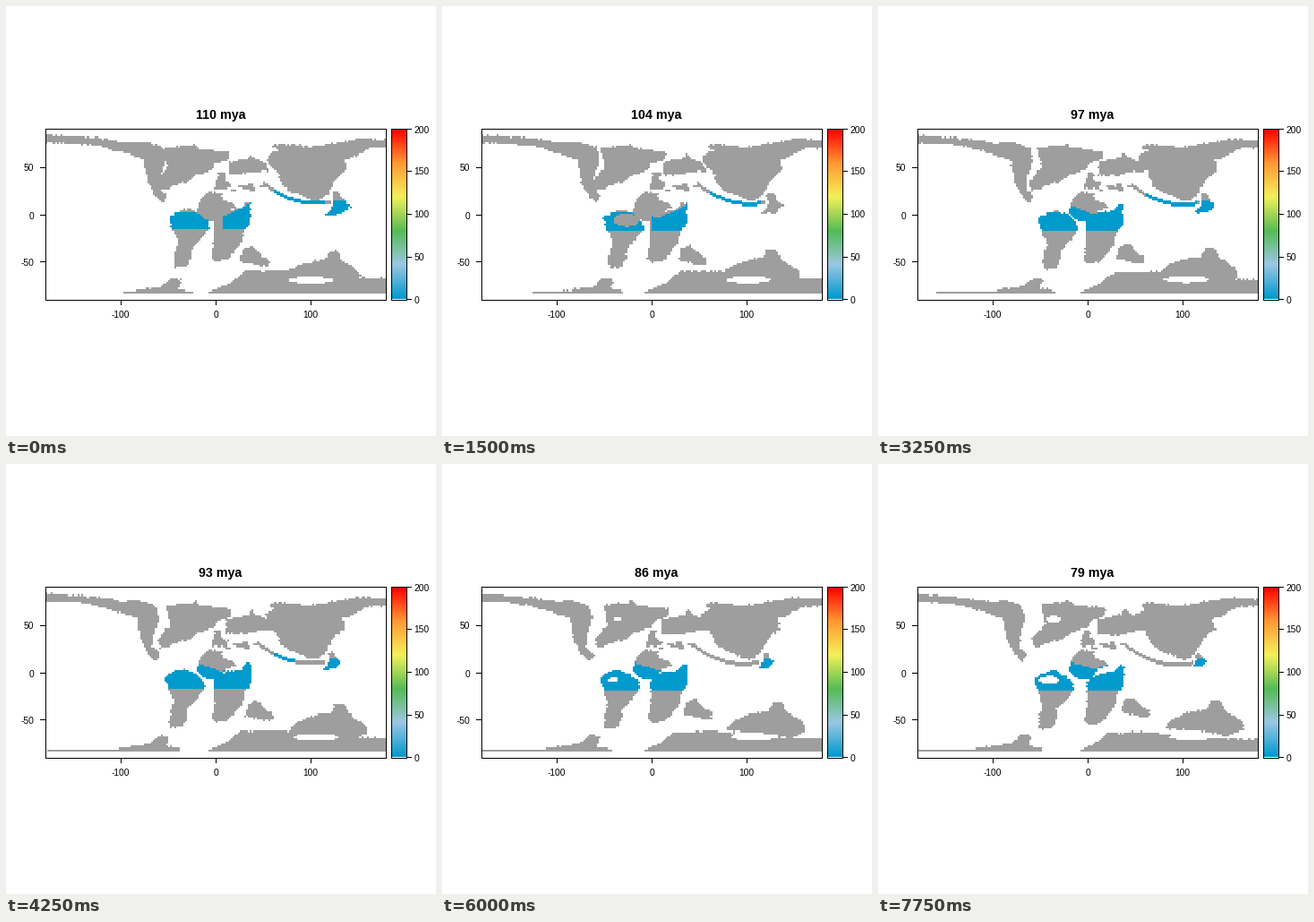
A matplotlib script for the animation above (8 s loop, 480 by 480 pixels).

```python
import matplotlib.pyplot as plt
import numpy as np
from matplotlib.animation import FuncAnimation
from matplotlib.colors import LinearSegmentedColormap, ListedColormap
from matplotlib.patches import Rectangle
from matplotlib.path import Path

SIZE, DPI = 480, 72
FIRST_AGE, MID_AGE, STEPS = 110, 95, 32
LEFT, RIGHT, TOP, BOTTOM = 44, 424, 137, 327
COLS, ROWS = 180, 90
LAST_ROW = 87  # no land this close to the south pole

# Cell centres in stage pixels, shaken a little for rough coasts
rng = np.random.default_rng(4)
X, Y = np.meshgrid(LEFT + (np.arange(COLS) + 0.5) * (RIGHT - LEFT) / COLS,
                   TOP + (np.arange(ROWS) + 0.5) * (BOTTOM - TOP) / ROWS)
cells = np.stack([X, Y], -1).reshape(-1, 2)
shaken = cells + rng.normal(0, 0.5, cells.shape)


class Plate:
    """Coast at MID_AGE; drifts and grows evenly with time."""

    def __init__(self, drift, grow, *coast):
        self.coast = np.array(coast, float)
        self.drift = np.array(drift)
        self.grow = grow

    def mask(self, t):
        mid = self.coast.mean(0)
        coast = mid + (self.coast - mid) * (1 + self.grow * t) + self.drift * t
        return Path(coast).contains_points(shaken).reshape(ROWS, COLS)


plates = {
    "west america": Plate(
        (-7, 0.5), 0, (30, 144), (72, 146), (108, 149), (132, 153), (150, 152),
        (168, 158), (172, 172), (166, 190), (165, 204), (174, 213), (168, 220),
        (160, 212), (152, 198), (147, 172), (126, 165), (98, 157), (72, 154),
        (30, 153)),
    "east america": Plate(
        (3, -1), 0, (178, 158), (212, 154), (216, 158), (252, 162), (250, 170),
        (236, 175), (232, 183), (214, 188), (204, 196), (184, 203), (172, 206),
        (168, 196), (184, 180), (182, 172)),
    "asia": Plate(
        (-2, 0.5), 0, (290, 167), (302, 162), (295, 157), (304, 154), (340, 158),
        (372, 152), (395, 148), (430, 150), (430, 158), (404, 159), (390, 167),
        (376, 172), (378, 184), (366, 194), (356, 212), (344, 219), (318, 208),
        (306, 200), (301, 186), (292, 178)),
    "baltic": Plate(
        (2, 0), 0.15, (246, 174), (270, 169), (275, 164), (280, 169), (294, 174),
        (299, 186), (286, 185), (266, 189), (246, 189)),
    "europe": Plate(
        (-4, 0), 0, (234, 186), (242, 186), (240, 194), (248, 198), (246, 203),
        (229, 204)),
    "north africa": Plate(
        (0, 0), 0, (212, 228), (218, 216), (226, 208), (240, 208), (244, 217),
        (258, 224), (244, 230), (240, 240), (226, 240), (214, 234)),
    "south africa": Plate(
        (1, 3), 0, (232, 240), (246, 231), (262, 229), (268, 222), (274, 222),
        (274, 244), (266, 254), (264, 266), (256, 277), (248, 285), (236, 288),
        (229, 283), (233, 264), (232, 250)),
    "south america": Plate(
        (-4, 2), 0, (178, 238), (188, 231), (200, 228), (212, 234), (222, 242),
        (223, 250), (214, 262), (204, 272), (203, 283), (198, 293), (184, 294),
        (184, 280), (188, 266), (182, 250)),
    "india": Plate(
        (5, -4), 0, (266, 281), (270, 268), (280, 264), (290, 275), (298, 279),
        (298, 287), (286, 286)),
    "australia": Plate(
        (6, -5), 0, (314, 300), (322, 290), (340, 282), (362, 278), (366, 269),
        (377, 269), (381, 279), (400, 292), (403, 302), (385, 308), (350, 303)),
    "antarctica": Plate(
        (-5, 2), 0, (216, 324), (246, 311), (262, 298), (312, 297), (345, 302),
        (400, 305), (435, 305), (435, 324)),
    "peninsula": Plate(
        (-13, -1), 0, (104, 323), (130, 317), (160, 313), (174, 302), (184, 305),
        (180, 315), (196, 318), (196, 323)),
    "east isle": Plate(
        (-6, -1), -0.3, (360, 210), (366, 209), (370, 217), (376, 222),
        (368, 229), (354, 230), (361, 221)),
}
islets = rng.uniform((246, 199), (282, 206), (7, 2))


def near(x, y, rx, ry):
    """Elliptic spot."""
    return ((X - x) / max(rx, 0.01)) ** 2 + ((Y - y) / max(ry, 0.01)) ** 2 < 1


def grid_at(age):
    """0 sea, 1 land, 2 warm land."""
    t = (MID_AGE - age) / 16
    s = (FIRST_AGE - age) / (STEPS - 1)
    late = max(t, 0)
    cool = np.exp(-((age - 101.5) / 3) ** 4)
    part = {name: plate.mask(t) for name, plate in plates.items()}

    # Island arc south of Asia, polar strip and loose islets
    bend = X + 6 * t - 340
    arc = (np.abs(Y - 222 - 2 * t + 22 * (bend / 58) ** 2) < 2.1) & (np.abs(bend + 20) < 38)
    strip = (Y > 318.6) & (X > 130 - 85 * min(1.8 * s, 1)) & (X < 200 - 25 * s)
    land = np.any(list(part.values()), axis=0) | arc | strip
    for x, y in islets:
        land |= (np.abs(X - x + 6 * t) < 3) & (np.abs(Y - y) < 1.5)

    sea = near(345 + 5 * t, 305 - t, 25, 4)
    sea |= near(191, 241, 11 * late, 4 * late)
    sea |= near(196, 173, 9 * late, 4 * late)
    land &= ~sea
    land[LAST_ROW:] = False

    # Warm belt: V-shaped upper edge in Africa, cool core in South America
    south = Y < 249 + 5 * s
    edge = 236 - 8 * s + 4 * cool - (0.5 - 0.25 * s) * np.abs(X - 241)
    west = np.interp(age, [97, 100, 110], [205, 230, 242])
    africa = part["north africa"] | part["south africa"]
    warm = africa & south & (Y > edge) & (X > west)
    core = near(206, 239, 24 * cool, 11 * cool)
    warm |= part["south america"] & south & (Y > 230) & ~core
    warm |= arc & (X > 299) & (X < np.interp(age, [89, 93, 97], [299, 322, 357]))
    if not 102 <= age <= 106:
        warm |= part["east isle"] & (Y > 218)
    return land.astype(int) + (land & warm)


grids = [grid_at(FIRST_AGE - i) for i in range(STEPS)]

plt.rcParams["font.family"] = "Liberation Sans"
fig = plt.figure(figsize=(SIZE / DPI, SIZE / DPI), dpi=DPI, facecolor="white")
ax = fig.add_axes([0, 0, 1, 1])
ax.axis("off")


def image(data, x0, x1, cmap, top):
    return ax.imshow(data, cmap=cmap, vmin=0, vmax=top, interpolation="nearest",
                     extent=(x0, x1, BOTTOM, TOP), aspect="auto")


def bar(x, y, w, h):
    ax.add_patch(Rectangle((x, y), w, h, fc="black", lw=0, antialiased=False,
                           zorder=3))


def frame(x, y, w, h):
    bar(x, y, w, 1)
    bar(x, y + h - 1, w, 1)
    bar(x, y, 1, h)
    bar(x + w - 1, y, 1, h)


def label(x, y, value, ha):
    ax.text(x, y, str(value), fontsize=10.3, ha=ha, va="baseline")


world = image(grids[0], LEFT, RIGHT,
              ListedColormap(["white", "#9e9e9e", "#009acd"]), 2)
ramp = LinearSegmentedColormap.from_list(
    "ramp", ["#009acd", "#9bc7e3", "#55bb55", "#f4f15a", "#ff9933", "#ff0000"])
image(np.linspace(1, 0, 190)[:, None], 430, 447, ramp, 1)
ax.set_xlim(0, SIZE)
ax.set_ylim(SIZE, 0)

frame(LEFT, TOP, RIGHT - LEFT + 1, BOTTOM - TOP + 2)
frame(430, TOP, 18, BOTTOM - TOP + 2)
for deg in (-100, 0, 100):
    x = round(234 + deg * 1.0556)
    bar(x, BOTTOM + 1, 1, 6)
    label(x, 348, deg, "center")
for deg in (-50, 0, 50):
    y = round(232.6 - deg * 1.0556)
    bar(38, y, 6, 1)
    label(31, y + 4.5, deg, "right")
for k in range(5):
    y = round(BOTTOM - 47.5 * k)
    bar(447, y, 6, 1)
    label(455.5, y + 4.5, 50 * k, "left")

title = ax.text(239.5, 126, "", fontsize=14.2, weight="bold", ha="center",
                va="baseline")


def update(i):
    world.set_data(grids[i])
    title.set_text(f"{FIRST_AGE - i} mya")
    return world, title


anim = FuncAnimation(fig, update, frames=STEPS, interval=250, repeat=True,
                     repeat_delay=0)
plt.show()
```
